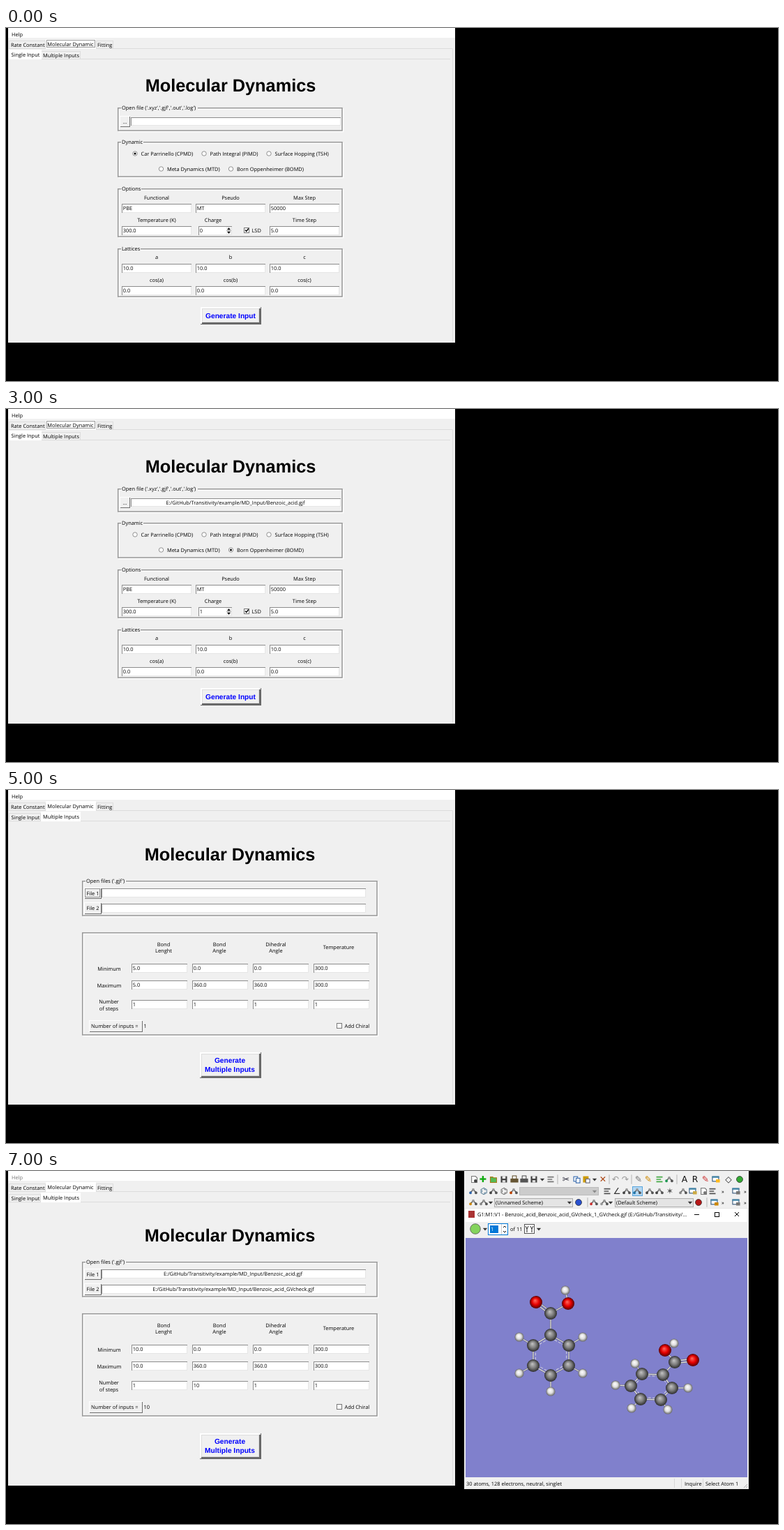
Recreate the animation shown at these times as an HTML page. Size 1107 px wide and 506 px high, loop 8000 ms.

```html
<!DOCTYPE html>
<html lang="en">
<head>
<meta charset="utf-8">
<title>Molecular Dynamics</title>
<style>
html, body { margin: 0; width: 100%; height: 100%; overflow: hidden; background: #000; }
svg { display: block; width: 1107px; height: 506px; }
text { font: 7.42px "Open Sans", sans-serif; white-space: pre; text-rendering: geometricPrecision; }
.c { text-anchor: middle; }
.e { text-anchor: end; }
.title { font: bold 25.3px "Liberation Sans", Arial, sans-serif; text-anchor: middle; }
.go { font: bold 10.2px "Liberation Sans", Arial, sans-serif; text-anchor: middle; fill: #00f; }
.code { font: 7.54px "Liberation Mono", monospace; fill: #f4f4f4; }
.icon { font: 11px "DejaVu Sans", sans-serif; text-anchor: middle; }
</style>
</head>
<body>
<svg id="stage" viewBox="0 0 1107 506"></svg>
<script>
const stage = document.getElementById('stage');
const PATH = 'E:/GitHub/Transitivity/example/MD_Input/Benzoic_acid';
const COLUMNS = [0, 1, 2];

// Drawing helpers: boxes take two corners, text takes its visual centre line.
const box = (x0, y0, x1, y1, fill) =>
  `<rect x="${x0}" y="${y0}" width="${x1 - x0}" height="${y1 - y0}" fill="${fill}"/>`;
const outline = (x0, y0, x1, y1, color, more = '') =>
  `<rect x="${x0 + .5}" y="${y0 + .5}" width="${x1 - x0 - 1}" height="${y1 - y0 - 1}" fill="none" stroke="${color}" ${more}/>`;
const path = (d, color = '#000', width = 1, more = '') =>
  `<path d="${d}" fill="none" stroke="${color}" stroke-width="${width}" ${more}/>`;
const disc = (x, y, r, fill, more = '') => `<circle cx="${x}" cy="${y}" r="${r}" fill="${fill}" ${more}/>`;
const escape = s => String(s).replace(/&/g, '&amp;');
const text = (x, y, s, cls = '', fill = '', dy = 2.6) =>
  `<text x="${x}" y="${y + dy}" class="${cls}"${fill && ` fill="${fill}"`}>${escape(s)}</text>`;
const label = (x, y, s) => text(x, y, s, 'c');
const each = (list, draw) => list.map(draw).join('');

// Widgets
const bevel = (x0, y0, x1, y1, fill, light, dark) =>
  box(x0, y0, x1, y1, light) + box(x0 + 1, y0 + 1, x1, y1, dark) + box(x0 + 1, y0 + 1, x1 - 1, y1 - 1, fill);
const entry = (x0, y0, x1, y1, s = '') =>
  bevel(x0, y0, x1, y1, '#fff', '#8c8c8c', '#e6e6e6') + text(x0 + 1.7, (y0 + y1) / 2, s);
const button = (x0, y0, x1, y1, s) =>
  bevel(x0, y0, x1, y1, '#f0f0f0', '#fff', '#707070') + label((x0 + x1) / 2, (y0 + y1) / 2, s);
const bigButton = (x0, y0, x1, y1) =>
  box(x0, y0, x1, y1, '#696969') + path(`M${x0 + 1} ${y1 - 1}V${y0 + 1}H${x1 - 1}`, '#fff', 2) +
  box(x0 + 2, y0 + 2, x1 - 3, y1 - 3, '#f0f0f0') + outline(x0 + 2, y0 + 2, x1 - 3, y1 - 3, '#dcdcdc');
const group = (x0, y0, x1, y1, name = '', width = 0) =>
  outline(x0 + 1.7, y0 + 1.7, x1, y1, '#fff', 'stroke-width="1.5"') +
  outline(x0 + .2, y0 + .2, x1 - 1.5, y1 - 1.5, '#989898', 'stroke-width="1.5"') +
  (name && box(x0 + 5, y0 - 3, x0 + 7 + width, y0 + 4, '#f0f0f0') + text(x0 + 6, y0 + .5, name));
const radio = (x, y, s, on) =>
  disc(x, y, 3.2, '#fff', 'stroke="#777" stroke-width=".8"') + (on ? disc(x, y, 1.5, '#000') : '') + text(x + 8.5, y + .5, s);
const check = (x, y, s, on) =>
  box(x, y, x + 8, y + 8, '#fff') + outline(x, y, x + 8, y + 8, '#777') +
  (on ? path(`M${x + 2} ${y + 3.5}l1.7 2 3-4`, '#000', 1.4) : '') + text(x + 11.5, y + 4.5, s);
const focus = (x0, y0, x1, y1) => outline(x0, y0, x1, y1, '#333', 'stroke-dasharray="1 1"');

// Toolbar pictograms; any other key is drawn as a glyph.
const PICTURES = {
  sheet: c => path('M-3-4H2L4-2V4H-3Z', '#777', 1, 'style="fill:#fff"') + disc(2, 2, 2, c),
  disk: c => box(-4, -4, 4, 4, c) + box(-2, -4, 2, -1, '#fff') + box(-2, 1, 2, 4, '#ddd'),
  folder: c => path('M-4 4V-3H-1L0-2H4V4Z', '#a87a18', 1, `style="fill:${c}"`),
  print: c => box(-3, -5, 3, 0, '#fff') + outline(-3, -5, 3, 0, c) + box(-5, -1, 5, 4, c),
  copy: c => box(-4, -4, 2, 3, '#fff') + outline(-4, -4, 2, 3, c) + box(-1, -2, 5, 5, '#fff') + outline(-1, -2, 5, 5, c),
  paste: c => box(-4, -4, 3, 4, c) + box(-1, -1, 5, 5, '#fff') + outline(-1, -1, 5, 5, '#667'),
  find: c => box(-4, -1, -1, 4, c) + box(1, -1, 4, 4, c) + box(-3, -4, 3, 1, c),
  zoom: c => path('M1 1L4 4', '#555', 1.5) + disc(-1, -1, 3, '#cde', `stroke="${c}"`),
  window: c => box(-5, -4, 4, 3, '#fff') + outline(-5, -4, 4, 3, '#357') + box(-5, -4, 4, -2, '#48a') + box(0, 0, 5, 4, c),
  lines: c => path('M-4-3H4M-4 0H2M-4 3H4', c, 1.4),
  ball: c => disc(0, 0, 4, c, 'stroke="#333" stroke-width=".7"'),
  bond: c => path('M-4 2L0-2L4 2', '#555', 1.2) + disc(-3.5, 2, 1.7, c) + disc(3.5, 2, 1.7, '#555') + disc(0, -2, 1.7, '#999'),
  drop: c => path('M-2.5-1H2.5L0 2Z', c, .3, `style="fill:${c}"`),
  bar: () => path('M0-6V6', '#bbb')
};
const icons = (y, spec) => each(spec.trim().split(/\s+/), item => {
  const [x, name, color = '#333'] = item.split(':');
  return `<g transform="translate(${x} ${y}) scale(1.12)">${PICTURES[name] ? PICTURES[name](color) : text(0, 0, name, 'icon', color, 4)}</g>`;
});
const windowButtons = (y, min, max, close) =>
  path(`M${min - 3} ${y + .5}h7`) + outline(max - 3, y - 3, max + 4, y + 4, '#000') + path(`M${close - 3} ${y - 3}l6 6m0-6l-6 6`);
const grip = (x, y) => path(`M${x} ${y}l5-5M${x + 3} ${y}l2-2`, '#aaa');

// Benzoic acid: six ring carbons, carboxyl C, =O, -OH, its H, then ring hydrogens.
function molecule(points, r) {
  const atoms = points.trim().split(' ').map(p => p.split(',').map(Number));
  const ring = atoms.slice(0, 6);
  const [cx, cy] = [0, 1].map(k => ring.reduce((sum, p) => sum + p[k], 0) / 6);
  const segment = ([ax, ay], [bx, by]) => `M${ax} ${ay}L${bx} ${by}`;
  const bond = (a, b) => path(segment(a, b), '#5c5c70', r * .27) + path(segment(a, b), '#dedede', r * .15);
  const inward = ([x, y]) => [x + (cx - x) * .13, y + (cy - y) * .13];
  const double = (a, b) => {
    const d = Math.hypot(b[0] - a[0], b[1] - a[1]), k = r * .2 / d;
    const ox = (a[1] - b[1]) * k, oy = (b[0] - a[0]) * k;
    return each([1, -1], s => bond([a[0] + s * ox, a[1] + s * oy], [b[0] + s * ox, b[1] + s * oy]));
  };
  const links = each(ring, (p, i) => {
    const next = ring[(i + 1) % 6];
    return bond(p, next) + path(segment(inward(p), inward(next)), '#cfcfdb', r * .12, `stroke-dasharray="${r * .45} ${r * .25}"`) +
      bond(p, atoms[i ? 9 + i : 6]);
  });
  const balls = each(atoms, ([x, y], i) => i < 7 ? disc(x, y, r, 'url(#C)') :
    i < 9 ? disc(x, y, r, 'url(#O)') : disc(x, y, r * .73, 'url(#H)'));
  return links + double(atoms[6], atoms[7]) + bond(atoms[6], atoms[8]) + bond(atoms[8], atoms[9]) + balls;
}
const shade = (id, a, b, c) => `<radialGradient id="${id}" fx=".42" fy=".36">
  <stop stop-color="${a}"/><stop offset=".55" stop-color="${b}"/><stop offset="1" stop-color="${c}"/></radialGradient>`;
const DEFS = `<defs>${shade('C', '#c4c4c4', '#7c7c7c', '#2c2c2c')}${shade('O', '#ff6a60', '#e60000', '#580000')}${shade('H', '#fff', '#dedede', '#666')}
  <clipPath id="editor"><rect x="679" y="61" width="313" height="359"/></clipPath></defs>`;

function mainWindow(multiple, focused, active) {
  return box(3, 0, 644, 451, '#f0f0f0') + box(3, 0, 644, 14, '#fff') + text(8, 9, 'Help', '', active ? '#000' : '#777') +
    path('M3.5 29.5H640.5V450M3.5 44.5H637', '#dcdcdc') +
    outline(4, 18, 57, 30, '#dcdcdc') + outline(129, 18, 154, 30, '#dcdcdc') +
    box(57, 16, 129, 30, '#fff') + (focused ? focus(58, 17, 128, 28) : '') +
    text(7, 24, 'Rate Constant') + label(92.5, 23, 'Molecular Dynamic') + text(131, 24, 'Fitting') +
    outline(multiple ? 4 : 50, 33, multiple ? 50 : 107, 45, '#dcdcdc') +
    (multiple ? box(50, 31, 107, 45, '#fff') : box(4, 31, 51, 45, '#fff')) +
    text(7.5, multiple ? 39 : 38, 'Single Input') + text(53, multiple ? 38 : 39, 'Multiple Inputs');
}

function singleInput(step) {
  const method = [0, 0, 1, 4, 4][step];
  const methods = [[185, 180, 'Car Parrinello (CPMD)'], [284, 180, 'Path Integral (PIMD)'], [377, 180, 'Surface Hopping (TSH)'],
    [222.5, 202, 'Meta Dynamics (MTD)'], [322.5, 202, 'Born Oppenheimer (BOMD)']];
  const x = i => 166 + i * 106.3 | 0;
  const row = (y, values) => each(values, (v, i) => v ? entry(x(i), y, x(i) + 100, y + 13, v) : '');
  const heads = (y, names) => each(names, (s, i) => label(216 + i * 106, y, s));
  return text(322, 82, 'Molecular Dynamics', 'title', '', 9) +
    group(160, 114, 484, 149, "Open file ('.xyz','.gjf','.out','.log')", 108) + button(163, 126, 178, 142, '...') +
    entry(179, 128, 480, 140) + (step ? label(329, 134, PATH + '.gjf') : '') +
    group(160, 163, 484, 215, 'Dynamic', 30) + each(methods, ([mx, my, s], i) => radio(mx, my, s, i === method)) +
    group(160, 230, 484, 301, 'Options', 27) +
    heads(243, ['Functional', 'Pseudo', 'Max Step']) + row(252, ['PBE', 'MT', '50000']) +
    heads(275, ['Temperature (K)', '', 'Time Step']) + label(297, 275, 'Charge') + row(284, ['300.0', '', '5.0']) +
    entry(276, 284, 324, 297, step > 2 ? 1 : 0) + box(316, 285, 323, 296, '#f0f0f0') +
    path('M317.5 289l2-2.5 2 2.5zM317.5 292l2 2.5 2-2.5z', '#000', .4, 'style="fill:#000"') + path('M316 290.5h7', '#aaa') +
    check(341, 286, 'LSD', true) +
    group(160, 316, 484, 387, 'Lattices', 26) +
    heads(328.5, ['a', 'b', 'c']) + row(338, COLUMNS.map(() => '10.0')) +
    heads(361, ['cos(a)', 'cos(b)', 'cos(c)']) + row(370, COLUMNS.map(() => '0.0')) +
    bigButton(279, 400, 366, 425) + text(322, 412, 'Generate Input', 'go', '', 3.7);
}

function multipleInputs(step) {
  const filled = step > 5, length = step > 6 ? '10.0' : '5.0', steps = filled ? '10' : '1';
  const row = (y, values) => each(values, (v, i) => entry(180 + i * 87, y, 260 + i * 87, y + 13, v));
  return text(321, 92, 'Molecular Dynamics', 'title', '', 9) +
    group(109, 130, 534, 182, "Open files ('.gjf')", 56) +
    button(112, 140, 137, 156, 'File 1') + (filled ? '' : focus(113, 141, 135, 154)) + entry(137, 141, 516, 154) +
    button(112, 161, 137, 178, 'File 2') + entry(137, 163, 516, 176) +
    (filled ? label(325.5, 147.5, PATH + '.gjf') + label(326, 169.5, PATH + '_GVcheck.gjf') : '') +
    group(109, 204, 534, 353) +
    each([[226, 'Bond', 'Lenght'], [306, 'Bond', 'Angle'], [387, 'Dihedral', 'Angle']], ([cx, a, b]) => label(cx, 221, a) + label(cx, 230.5, b)) +
    label(477, 225.5, 'Temperature') + label(148, 256, 'Minimum') + label(148, 280, 'Maximum') +
    label(147.5, 303.5, 'Number') + label(147.5, 313, 'of steps') +
    row(249, [length, '0.0', '0.0', '300.0']) + row(273, [length, '360.0', '360.0', '300.0']) + row(301, ['1', steps, '1', '1']) +
    button(119, 330, 196, 347, '') + text(122, 338, 'Number of inputs =') + text(197.5, 338, steps) +
    check(474, 334, 'Add Chiral') +
    bigButton(278, 376, 366, 413) + text(321, 387.5, 'Generate', 'go', '', 3.7) + text(321, 400, 'Multiple Inputs', 'go', '', 3.7);
}

function successDialog() {
  return box(466, 150, 640, 248, '#9aa0a8') + box(467, 151, 639, 247, '#fff') + box(467, 220, 639, 247, '#f0f0f0') +
    box(471, 154, 482, 165, '#111') + text(485, 160, 'Success', '', '#777') + path('M626 156l6 6m0-6l-6 6', '#888') +
    disc(489, 195, 10, '#0f79d0') + disc(489, 190.5, 1.2, '#fff') + box(488, 193, 490, 201, '#fff') +
    text(505, 195, 'The input was successfully created') +
    box(581, 227, 629, 241, '#e1e1e1') + outline(581, 227, 629, 241, '#adadad') + label(605, 234, 'OK');
}

const CODE = `  Benzoic_acid.gjf  Temperature  300.0K CELL:  L1 = 10.0  L2 = 10.0  L3 = 10.0
&END

&CPMD
  MOLECULAR DYNAMICS BO
  LSD
  MEMORY BIG
  TRAJECTORY SAMPLE XYZ
    5
  RESTFILE
    1
  STORE
    200
  CENTER MOLECULE ON
  MAXSTEP
    50000
  TIMESTEP
    5.0
  NOSE IONS MASSIVE
    300.0   2000.0
  SPLINE POINTS
    5000
&END

&DFT
  NEWCODE
  FUNCTIONAL PBE
&END

&SYSTEM
  CHARGE
    1
  SYMMETRY
    1
  ANGSTROM`.split('\n');

function editorWindow() {
  const menu = (y, items) => each(items.split(' '), item => {
    const [x, s] = item.split(':');
    return text(+x, y, s, '', '#555');
  });
  return box(647, 0, 1006, 450, '#f0f0f0') + box(647, 0, 1006, 27, '#fff') +
    menu(9, '652:Arquivo 688:Editar 716:Localizar 754:Visualizar 795:Formatar 834:Linguagem 881:Configurações 940:Ferramentas') +
    menu(21, '652:Macro 682:Executar 720:Plugins 754:Janela 783:? 996:X') +
    box(976, 28, 990, 42, '#cce4f7') + outline(976, 28, 990, 42, '#4a9ad8') +
    icons(35, `656:sheet:#5a5 670:folder:#f4c455 685:disk:#888 699:disk:#888 714:sheet:#e63 728:sheet:#e63 743:print:#4a78b5 753:bar
      763:✂:#888 778:copy:#888 793:paste:#888 803:bar 812:↶:#888 828:↷:#888 838:bar 847:find:#345 862:bond:#27b 872:bar
      882:zoom:#27b 896:zoom:#c33 906:bar 916:window:#fb4 931:window:#fb4 941:bar 951:lines:#27b 966:¶:#27b 983:lines:#14c`) +
    text(997, 32, '»') + box(647, 45, 1006, 61, '#e8e8e8') +
    box(648, 45, 768, 61, '#f6f6f6') + box(648, 45, 768, 47, '#faaa3c') + outline(648, 45, 768, 62, '#b0b0b0') +
    icons(54, '655:disk:#3a7ec0') + text(661, 54, 'Benzoic_acid_Run_BOMD.inp') +
    outline(757, 50, 764, 57, '#c55') + path('M759 52l3 3m0-3l-3 3', '#c33') +
    box(647, 61, 992, 420, '#000') + box(647, 61, 679, 420, '#2b2b2b') +
    each(CODE, (_, i) => text(666, 67 + i * 10.24, i + 4, 'code e', '#ddd', 2.4)) +
    `<g clip-path="url(#editor)">${each(CODE, (s, i) => text(678, 67 + i * 10.24, s, 'code', '', 2.4))}</g>` +
    path('M995 69l3-3 3 3', '#444', 1.2) + box(993, 74, 1004, 170, '#cdcdcd') +
    box(661, 421, 911, 432, '#cdcdcd') + path('M657 423l-3 3 3 3M985 423l3 3-3 3', '#444', 1.2) +
    path('M647 433.5h359M825.5 435v13M895.5 435v13M972.5 435v13', '#d0d0d0') +
    text(648, 442, 'len') + text(662, 442, 'Ln : 1') + text(687, 442, 'Col : 1') + text(716, 442, 'Pos : 1') +
    text(828, 442, 'Windows (CR LF)') + text(899, 442, 'UTF-8') + text(976, 442, 'INS') + grip(999, 448);
}

function viewerSmall() {
  return box(808, 83, 1107, 420, '#e8e8e8') + box(809, 84, 1107, 104, '#fff') + box(814, 88, 823, 98, '#a33') +
    text(827, 93, 'G1:M1:V1 - Benzoic_acid_GVcheck.gjf (E:/GitHub/Transitivit...') + windowButtons(92, 1051, 1079, 1108) +
    box(809, 103, 1107, 404, '#f0f0f0') + box(810, 104, 1107, 403, '#8080cc') + box(809, 404, 1107, 419, '#f0f0f0') +
    molecule('968,259 989,221 965,184 922,186 903,224 925,261 992,299 979,334 1034,296 1045,324 1023,219 982,154 904,156 868,225 909,291', 13) +
    text(811, 412, '15 atoms, 64 electrons, neutral, singlet') + text(1033, 412, 'Inquire') + text(1063, 412, 'Select Atom 1') +
    path('M1017.5 405v13M1028.5 405v13M1059.5 405v13', '#d8d8d8');
}

function viewerLarge() {
  const combo = (x0, x1, s) => box(x0, 39, x1, 52, '#e4e4e4') + outline(x0, 39, x1, 52, '#adadad') +
    text(x0 + 2, 45.5, s) + icons(45, `${x1 - 5}:drop`);
  return box(657, 0, 1065, 456, '#f0f0f0') +
    icons(12, `671:sheet:#444 684:✚:#1a1 699:folder:#5b5 714:disk:#444 729:print:#653 743:print:#555 757:disk:#444 769:drop 781:lines:#777 791:bar
      803:✂:#223 818:copy:#36a 832:paste:#c90 844:drop 856:✕:#a41 865:bar 874:↶:#999 888:↷:#999 897:bar 907:✎:#777 921:✎:#c80
      937:lines:#4a4 951:bond:#295 962:bar 973:A:#111 988:R:#111 1003:✎:#c33 1018:window:#fb2 1036:◇:#222 1052:ball:#3a3`) +
    box(898, 22, 913, 36, '#b5d8f3') + outline(898, 22, 913, 36, '#59a5dc') +
    box(736, 23, 850, 35, '#ccc') + outline(736, 23, 850, 35, '#bbb') +
    icons(29, `670:bond:#36a 685:⌬:#257 699:bond:#444 714:⌬:#444 728:bond:#b40 844:drop:#888 862:lines:#555 876:∠:#333 890:bond:#444
      905:bond:#27a 923:bond:#444 937:bond:#444 952:✶:#555 971:bond:#888 985:window:#ca4 1000:sheet:#777 1013:lines:#555 1047:window:#777`) +
    icons(45, `670:bond:#c80 685:bond:#888 695:drop 821:ball:#2850d0 834:bar 843:bond:#c33 858:bond:#999 867:drop 993:ball:#b81818
      1005:bar 1016:window:#c80 1047:window:#777`) +
    each([29, 45], y => text(1026, y, '»') + text(1058, y, '»')) +
    combo(700, 813, '(Unnamed Scheme)') + combo(873, 986, '(Default Scheme)') +
    box(657, 53, 1065, 73, '#fff') + outline(657, 53, 1065, 456, '#e8e8e8') + box(663, 57, 672, 67, '#a33') +
    text(676, 62.5, 'G1:M1:V1 - Benzoic_acid_Benzoic_acid_GVcheck_1_GVcheck.gjf (E:/GitHub/Transitivity/...') +
    windowButtons(62, 990, 1019, 1048) +
    disc(673, 83, 7.3, '#84d45c', 'stroke="#555" stroke-width=".8"') + icons(83, '687:drop 764:drop') +
    box(691, 75, 720, 92, '#fff') + outline(691, 75, 720, 92, '#0078d7') + box(694, 78, 706, 89, '#0078d7') + text(695, 83.5, '1', '', '#fff') +
    path('M710.5 76v15', '#ccc') + path('M713 81l2-2 2 2M713 86l2 2 2-2') + text(723, 83.5, 'of 11') +
    box(743, 76, 758, 90, '#fff') + outline(743, 76, 758, 90, '#555') + path('M745 79l2 4v5m0-5l2-4M752 79l2 4v5m0-5l2-4', '#222') +
    box(659, 96, 1063, 439, '#8080cc') +
    molecule('781,235 807,250 807,279 781,293 756,279 756,250 781,204 760,188 806,190 802,171 827,238 827,290 781,316 736,290 736,238', 9) +
    molecule('942,292 955,311 939,328 910,327 896,308 912,291 959,274 985,271 945,257 958,247 978,311 949,342 897,340 874,307 902,276', 9) +
    text(660, 448, '30 atoms, 128 electrons, neutral, singlet') + text(973, 448, 'Inquire') + text(1003, 448, 'Select Atom 1') +
    path('M958.5 441v13M968.5 441v13M999.5 441v13', '#d8d8d8') + grip(1058, 454);
}

function scene(step) {
  const multiple = step > 4;
  return DEFS + mainWindow(multiple, step < 4, step !== 4 && step !== 7) +
    (multiple ? multipleInputs(step) : singleInput(step)) +
    (step === 4 ? editorWindow() + viewerSmall() + successDialog() : '') +
    (step === 7 ? viewerLarge() : '');
}

let shown = -1;
function tick() {
  const step = Math.floor(performance.now() % 8000 / 1000);
  if (step !== shown) stage.innerHTML = scene(shown = step);
  requestAnimationFrame(tick);
}
tick();
</script>
</body>
</html>
```
